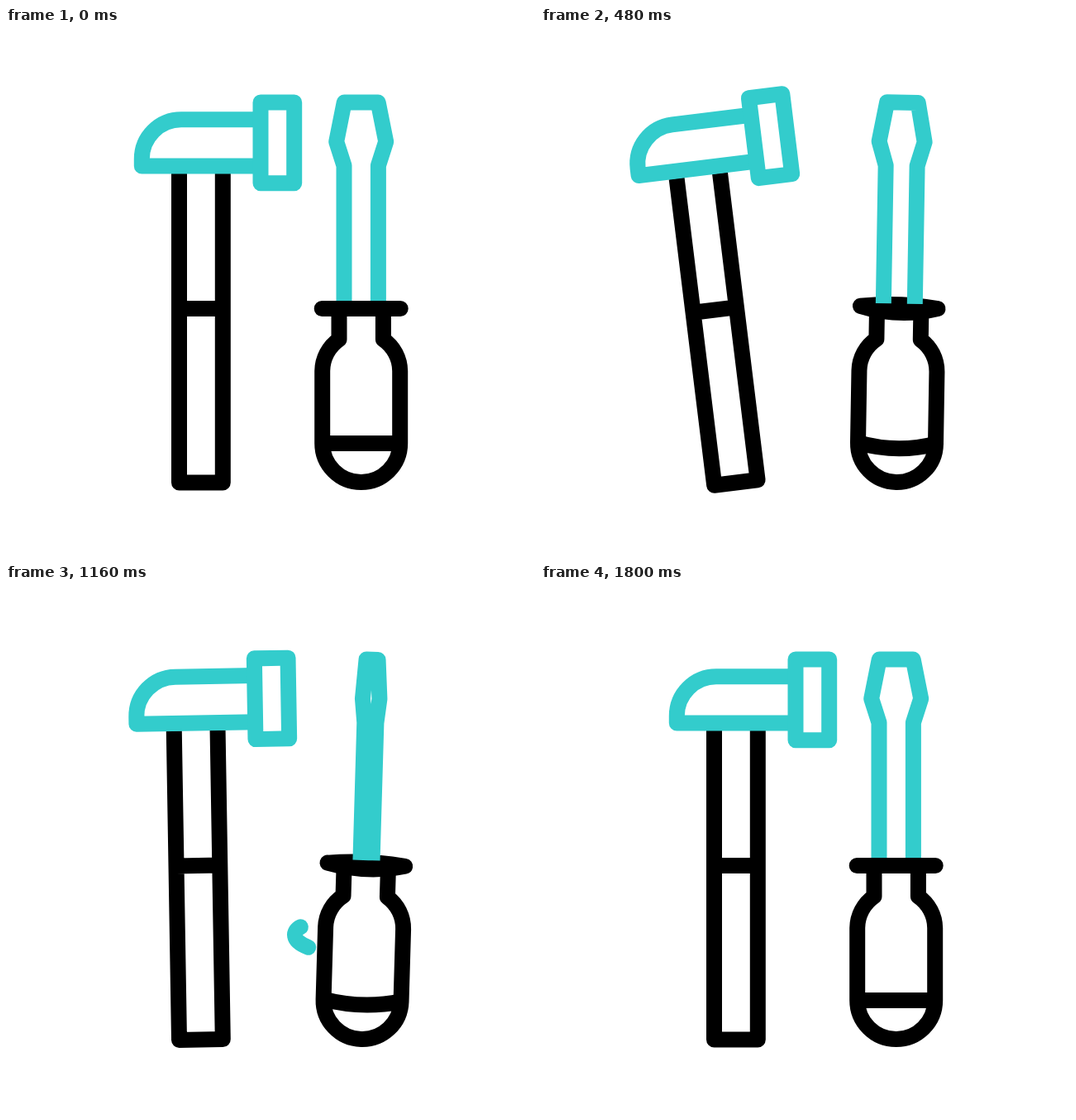
An HTML page with a canvas for the animation above (2280 ms loop, 640 by 640 pixels).

```html
<!DOCTYPE html>
<html lang="en">
<head>
<meta charset="utf-8">
<title>Hammer and screwdriver</title>
<style>
html, body { margin: 0; width: 100%; height: 100%; overflow: hidden; background: #fff; }
canvas { display: block; width: 640px; height: 640px; }
</style>
</head>
<body>
<canvas id="stage" width="640" height="640"></canvas>
<script>
const ctx = document.getElementById('stage').getContext('2d');
const TEAL = '#33cccc', BLACK = '#000';
const LOOP = 2280, STEP = 40, LAST = 1800, SWING = 1120;
const SWIRL = 208; // length of the swirl path
const MID = 429.7; // screwdriver axis

const rad = deg => deg * Math.PI / 180;
const ramp = (t, a, b) => Math.min(1, Math.max(0, (t - a) / (b - a)));
const ease = u => (1 - Math.cos(Math.PI * u)) / 2;
const glide = (t, a, b) => ease(ramp(t, a, b));

// Raise slowly, strike fast, rest.
function hammerAngle(t) {
  const c = t % SWING;
  return -7 * Math.sin(Math.PI / 2 * ramp(c, 0, 460)) * (1 - ramp(c, 480, 680));
}

// Lean right, left, right again, then upright.
function tilt(t) {
  return 3.2 * glide(t, 0, 340) - 6.8 * glide(t, 340, 700)
    + 5.5 * glide(t, 700, 1230) - 1.9 * glide(t, 1230, 1423);
}

// How far the round parts are seen from above, 0 to 1.
const bulge = t => ramp(t, 0, 690) - ramp(t, 960, 1460);

// One full turn of the blade, quicker at its start.
const spin = t => 2 * Math.PI * ease(ramp(t, 360, 1610) ** 0.77);

function stroke(color, path, cap = 'butt') {
  ctx.strokeStyle = color;
  ctx.lineCap = cap;
  ctx.stroke(new Path2D(path));
}

function turned(x, y, deg, paint) {
  ctx.save();
  ctx.translate(x, y);
  ctx.rotate(rad(deg));
  ctx.translate(-x, -y);
  paint();
  ctx.restore();
}

function drawHammer() {
  stroke(BLACK, 'M209.5 176V550H262.3V176M209.5 339.5H262.3');
  stroke(TEAL, 'M308 110.7H212A47.7 47.7 0 0 0 164.3 158.4V167H308');
  stroke(TEAL, 'M308 90H348.7V187.7H308Z');
}

function drawHandle(p) {
  stroke(BLACK, 'M403 340V376.7A47 47 0 0 0 382.7 415V502.5' +
    'A47 47 0 0 0 476.7 502.5V415A47 47 0 0 0 456.4 376.7V340');
  stroke(BLACK, `M382.7 502.5Q${MID} ${502.5 + 18 * p} 476.7 502.5`);

  const y = 339.5, half = 47.5 - p;
  const left = `${MID - half} ${y - 3.5 * p}`;
  const right = `${MID + half} ${y - 1.1 * p}`;
  stroke(BLACK, `M${left}Q${MID} ${y - 11.7 * p} ${right}` +
    `Q${MID} ${y + 16.3 * p} ${left}`, 'round');
}

function drawBlade(s, foot) {
  const side = [[20.7, foot], [20.7, 166.5], [30, 137.5], [20.5, 90]];
  const left = side.map(([w, y]) => `${MID - w * s} ${y}`);
  const right = side.map(([w, y]) => `${MID + w * s} ${y}`).reverse();
  stroke(TEAL, 'M' + left.concat(right).join('L'));
}

function drawSwirl(tail, head) {
  if (head <= tail) return;
  ctx.setLineDash([head - tail, 1000]);
  ctx.lineDashOffset = -tail;
  stroke(TEAL, 'M506.5 416C516 421 518 434 494 441' +
    'C470 448 389 448 365 441C341 434 343 421 352.5 416', 'round');
  ctx.setLineDash([]);
}

function drawDriver(t) {
  const p = bulge(t);
  drawHandle(p);
  drawBlade(Math.abs(Math.cos(spin(t))), 330 + 5 * p);
  drawSwirl(SWIRL * glide(t, 800, 1300), SWIRL * glide(t, 504, 1096));
}

function draw(t) {
  ctx.fillStyle = '#fff';
  ctx.fillRect(0, 0, 640, 640);
  ctx.lineWidth = 19;
  ctx.lineJoin = 'round';
  turned(236, 550, hammerAngle(t), drawHammer);
  turned(MID, 549.5, tilt(t), () => drawDriver(t));
}

const start = performance.now();
function tick() {
  const t = (performance.now() - start) % LOOP;
  draw(Math.min(LAST, Math.floor(t / STEP) * STEP));
  requestAnimationFrame(tick);
}
tick();
</script>
</body>
</html>
```
